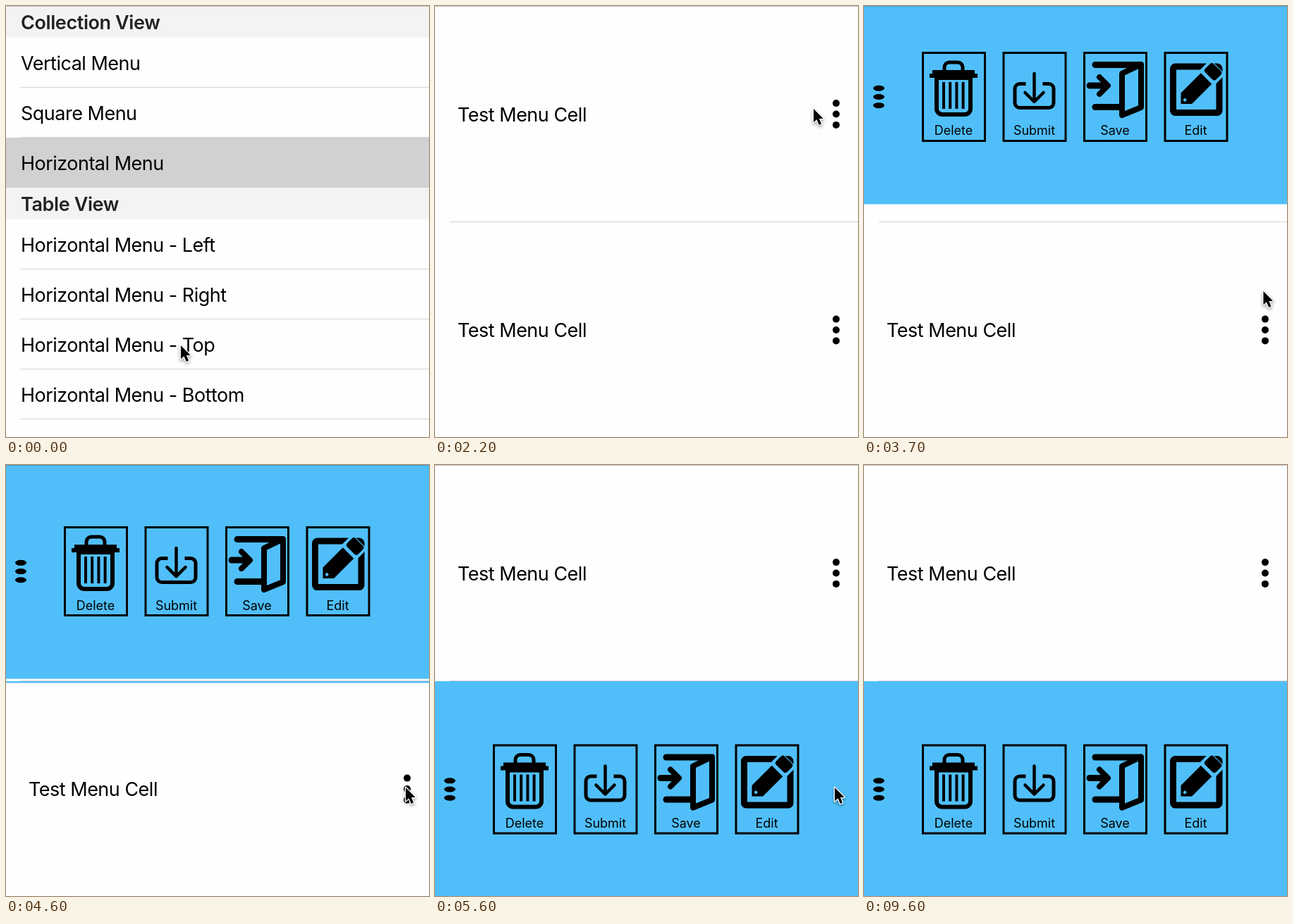
An HTML page with a canvas that plays this animation: 600 by 612 pixels, repeating every 9.7 s.

```html
<!DOCTYPE html>
<html lang="en">
<head>
<meta charset="utf-8">
<title>Slide menu</title>
<style>
html, body { margin: 0; width: 600px; height: 612px; overflow: hidden; background: #fefdff; }
canvas { display: block; }
</style>
</head>
<body>
<canvas id="stage" width="600" height="612"></canvas>
<script>
const ctx = document.getElementById('stage').getContext('2d');
const W = 600, H = 612, LOOP = 9700, STEP = 100;
const ROW = 71, BAND = 45, CELL = 306.5, INSET = 21;
const PAPER = '#fefdff', BLUE = '#50bff9', GRAY = '#d2d0d3', LINE = '#d3d2d6', HEADER = '#f3f3f3';
const FONT = 'Inter, Roboto, sans-serif';

const clamp = (v, lo = 0, hi = 1) => Math.max(lo, Math.min(hi, v));
const mix = (a, b, p) => a + (b - a) * p;
const bezier = (a, b, u) => 3 * a * u * (1 - u) ** 2 + 3 * b * u * u * (1 - u) + u ** 3;

function easeInOut(x) {
  x = clamp(x);
  let lo = 0, hi = 1;
  for (let i = 0; i < 24; i++) {
    const mid = (lo + hi) / 2;
    if (bezier(0.42, 0.58, mid) < x) lo = mid; else hi = mid;
  }
  return bezier(0, 1, lo);
}

const during = (t, from, to) => easeInOut((t - from) / (to - from));

// Critically damped spring, settles after about 0.55 s
function spring(seconds) {
  if (seconds <= 0) return 0;
  if (seconds > 0.55) return 1;
  const k = 15 * seconds;
  return 1 - (1 + k) * Math.exp(-k);
}

function rect(x, y, w, h, color = '#000') {
  ctx.fillStyle = color;
  ctx.fillRect(x, y, w, h);
}

function text(str, x, y, size = 27, weight = 400, color = '#000', align = 'left') {
  ctx.font = `${weight} ${size}px ${FONT}`;
  ctx.letterSpacing = size < 20 ? '0px' : weight > 400 ? '-0.4px' : '-0.5px';
  ctx.textAlign = align;
  ctx.fillStyle = color;
  ctx.fillText(str, x, y);
}

function stroke(width, color = '#000') {
  ctx.lineWidth = width;
  ctx.strokeStyle = color;
  ctx.stroke();
}

function trace(points, closed) {
  ctx.beginPath();
  points.forEach(([x, y]) => ctx.lineTo(x, y));
  if (closed) ctx.closePath();
}

function fill(points) {
  ctx.fillStyle = '#000';
  trace(points, true);
  ctx.fill();
}

function line(width, x1, y1, x2, y2) {
  trace([[x1, y1], [x2, y2]]);
  stroke(width);
}

// Two strokes of equal reach that meet at the tip, opposite to direction (dx, dy)
function arrowhead(width, x, y, reach, dx, dy) {
  const back = side => [x - reach * (dx + side * dy), y - reach * (dy + side * dx)];
  trace([back(1), [x, y], back(-1)]);
  stroke(width);
}

function box(x, y, w, h, radii, width) {
  ctx.beginPath();
  ctx.roundRect(x, y, w, h, radii);
  stroke(width);
}

function dots(x, y, gap, rx, ry) {
  ctx.fillStyle = '#000';
  for (let i = -1; i <= 1; i++) {
    ctx.beginPath();
    ctx.ellipse(x, y + i * gap, rx, ry, 0, 0, 7);
    ctx.fill();
  }
}

// Icons use coordinates relative to the top left corner of their button
function trash() {
  box(32, 15, 26, 14, [7, 7, 0, 0], 5);
  rect(15, 26, 60, 6);
  rect(11, 31, 68, 6);
  box(21, 37, 48, 52, [0, 0, 8, 8], 6);
  for (let i = 0; i < 4; i++) rect(29 + i * 9.2, 43, 4, 38);
}

function tray() {
  box(17.5, 45.5, 55, 34, 7, 5);
  rect(33, 42, 24, 8, BLUE);
  line(4.5, 45, 31, 45, 70);
  arrowhead(4.5, 45, 71, 13, 0, 1);
}

function door() {
  line(9, 17, 18.5, 81, 18.5);
  line(9, 17, 78.5, 52, 78.5);
  trace([[55, 31], [82, 18], [82, 79], [55, 90]], true);
  stroke(8);
  line(9, 9, 48, 33, 48);
  arrowhead(8, 35, 48, 12, 1, 0);
}

function pencil() {
  box(13, 21, 65.5, 65.5, 3, 9);
  ctx.translate(24, 74);
  ctx.rotate(-Math.PI / 4);
  rect(30, -15, 44, 30, BLUE);
  fill([[0, 0], [11, -11], [51, -11], [51, 11], [11, 11]]);
  ctx.beginPath();
  ctx.roundRect(56, -11, 17, 22, 4);
  ctx.fill();
  rect(6, -2, 4, 4, BLUE);
}

const buttons = { Delete: trash, Submit: tray, Save: door, Edit: pencil };

function drawButton(label, icon) {
  ctx.lineJoin = 'miter';
  box(1.5, 1.5, 88, 125, 0, 3);
  text(label, 45, 118.5, 18, 400, '#000', 'center');
  ctx.lineJoin = ctx.lineCap = 'round';
  icon();
}

function drawMenu(progress) {
  ctx.save();
  ctx.translate(0, (progress - 1) * CELL);
  rect(0, 0, W, CELL, BLUE);
  dots(21, 154, 12.2, 8, 4);
  Object.entries(buttons).forEach(([label, icon], i) => {
    ctx.save();
    ctx.translate(82 + 114.5 * i, 90);
    drawButton(label, icon);
    ctx.restore();
  });
  ctx.restore();
}

function drawCell(index, progress) {
  ctx.save();
  ctx.beginPath();
  ctx.rect(0, index * 307, W, 306);
  ctx.clip();
  ctx.translate(0, index * CELL);
  text('Test Menu Cell', 32, 163.5);
  dots(569, 153.5, 15.4, 5, 5);
  if (progress > 0) drawMenu(progress);
  ctx.restore();
}

function drawDetail(t) {
  const open = during(t, 2900, 3900);
  const swap = during(t, 4530, 5530);
  rect(0, 0, W, H, PAPER);
  drawCell(0, open - swap);
  drawCell(1, swap);
  rect(INSET, 306, W - INSET, 1, LINE);
}

function drawSection(title, top, labels, isSelected) {
  rect(0, top, W, BAND, HEADER);
  text(title, INSET, top + 33, 27, 600, '#222226');
  labels.forEach((label, i) => {
    const y = top + BAND + ROW * i;
    if (isSelected(i)) rect(0, y, W, ROW, GRAY);
    else rect(INSET, y + ROW - 1, W - INSET, 1, LINE);
    text(label, INSET, y + 45.5);
  });
}

function drawList(t) {
  const sides = ['Left', 'Right', 'Top', 'Bottom'];
  rect(0, 0, W, H, PAPER);
  drawSection('Collection View', 0, ['Vertical Menu', 'Square Menu', 'Horizontal Menu'], i => i === 2);
  drawSection('Table View', 258, sides.map(side => 'Horizontal Menu - ' + side), i => i === 2 && t >= 100);
}

// From the list to the upper dots, a sway beside them, then the lower dots and away
function pointerAt(t) {
  const sway = 54 * Math.cos(Math.PI * (clamp(t, 1200, 2400) - 1200) / 800) ** 2;
  const dip = 21 * Math.sin(Math.PI * clamp((t - 3800) / 700));
  const lower = during(t, 3200, 3900), leave = during(t, 5950, 6500);
  const x = mix(247, 563 - sway, during(t, 850, 1200));
  const y = mix(481 - 5 * during(t, 300, 500), 145, during(t, 850, 1300));
  return [x + 3 * lower - 8 * leave, mix(y, 457, lower) + dip + 50 * leave];
}

function drawPointer(t) {
  if (t >= 6600) return;
  const [x, y] = pointerAt(t);
  const arrow = [[0, 0], [0, 22], [5, 17.4], [9, 26], [12.5, 24.5], [9, 16], [15.5, 15.5]];
  ctx.save();
  ctx.translate(x + 1, y + 1);
  ctx.scale(0.88, 0.88);
  ctx.lineJoin = 'round';
  ctx.shadowColor = 'rgba(0,0,0,.4)';
  ctx.shadowBlur = 4;
  ctx.shadowOffsetY = 2;
  trace(arrow, true);
  stroke(3, '#fff');
  ctx.shadowColor = 'transparent';
  fill(arrow);
  ctx.restore();
}

function drawPage(page, t, left) {
  ctx.save();
  ctx.translate(left, 0);
  page(t);
  ctx.restore();
}

function draw(t) {
  const push = spring((t - 230) / 1000);
  const edge = W * (1 - push);
  if (push < 1) {
    drawPage(drawList, t, -0.3 * W * push);
    rect(0, 0, edge, H, `rgba(0,0,0,${0.1 * push})`);
  }
  if (push > 0) drawPage(drawDetail, t, edge);
  rect(0, 0, W, 1, 'rgba(60,60,60,.3)');
  drawPointer(t);
}

const start = performance.now();
function tick() {
  const t = (performance.now() - start) % LOOP;
  draw(Math.floor(t / STEP) * STEP);
  requestAnimationFrame(tick);
}
tick();
</script>
</body>
</html>
```
